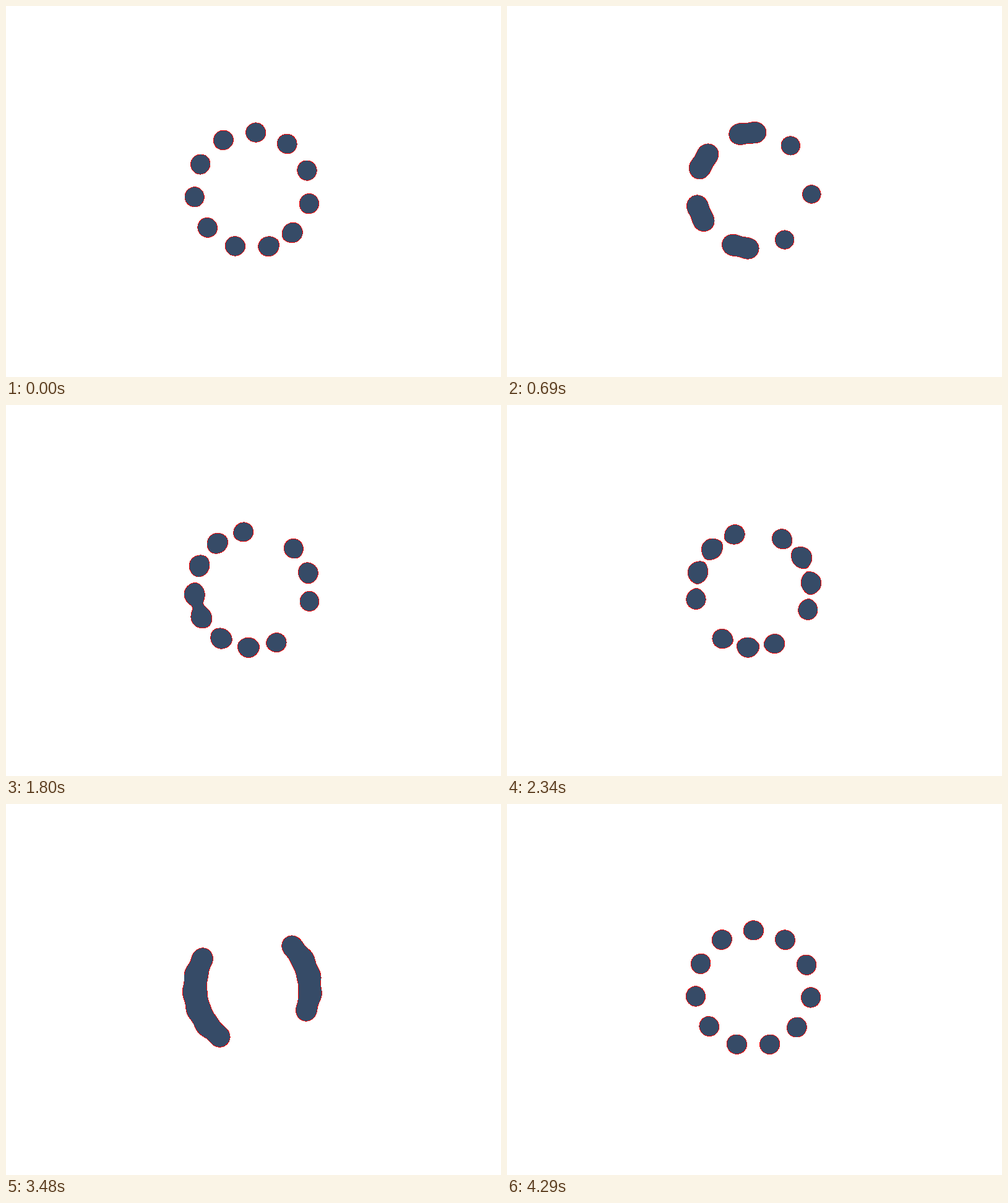
Write an HTML page with a canvas that moves like this. It is 800 px wide and 600 px high and loops after 4320 ms.

```html
<!DOCTYPE html>
<html lang="en">
<head>
<meta charset="utf-8">
<title>Metaball ring</title>
<style>
  html, body { margin: 0; width: 100%; height: 100%; overflow: hidden; background: #fff; }
  canvas { display: block; }
</style>
</head>
<body>
<canvas id="stage" width="800" height="600"></canvas>
<script>
const ctx = document.getElementById('stage').getContext('2d');

const LOOP = 4320, STEP = 30;
const COUNT = 11, CX = 398.2, CY = 298.5, RING = 94.5, PHASE = 40.8;
const STRENGTH = 203;                 // squared radius of a lone ball
const RIM = 0.8;                      // width of the red edge
const LEFT = 264, TOP = 164, SIZE = 268;
const START = 33.22, TRAVEL = 360 * 5 / COUNT;

// [time in ms, spread angle in degrees, speed in degrees per ms]
const keys = [
  [0, START, 0.0133],
  [690, 53.8, 0.048],
  [1200, 82.45, 0.053],
  [1800, 110.43, 0.040],
  [2820, 144.85, 0.036],
  [3480, 171.15, 0.044],
  [3780, 184.2, 0.037],
  [LOOP, START + TRAVEL, 0.0133]
];

// Cubic Hermite interpolation between the keys
function spreadAt(t) {
  let i = 0;
  while (i < keys.length - 2 && t >= keys[i + 1][0]) i++;
  const [t0, a0, v0] = keys[i], [t1, a1, v1] = keys[i + 1];
  const d = t1 - t0, p = (t - t0) / d, q = 1 - p;
  return a0 * q * q * (1 + 2 * p) + a1 * p * p * (3 - 2 * p)
       + d * p * q * (v0 * q - v1 * p);
}

// Ball n turns n times as fast as the first one
function ballsAt(t) {
  const spread = spreadAt(t);
  return Array.from({ length: COUNT }, (_, i) => {
    const a = (PHASE + (i + 1) * spread) * Math.PI / 180;
    return [CX + RING * Math.cos(a), CY + RING * Math.sin(a)];
  });
}

const image = ctx.createImageData(SIZE, SIZE);
const pixels = new Uint32Array(image.data.buffer);
const rgb = (r, g, b) => (255 << 24 | b << 16 | g << 8 | r) >>> 0;
const WHITE = rgb(255, 255, 255), FILL = rgb(54, 75, 103), EDGE = rgb(255, 0, 0);

function colourAt(x, y, balls) {
  let field = 0, gx = 0, gy = 0;
  for (const [bx, by] of balls) {
    const dx = x - bx, dy = y - by;
    const near = 1 / (dx * dx + dy * dy + 1e-6), pull = STRENGTH * near;
    field += pull;
    gx += 2 * pull * near * dx;
    gy += 2 * pull * near * dy;
  }
  if (field < 1) return WHITE;
  // Depth below the surface, to first order
  return field - 1 < RIM * Math.hypot(gx, gy) && field < 1.3 ? EDGE : FILL;
}

function draw(t) {
  const balls = ballsAt(t);
  for (let y = 0, k = 0; y < SIZE; y++) {
    for (let x = 0; x < SIZE; x++, k++) {
      pixels[k] = colourAt(x + LEFT + 0.5, y + TOP + 0.5, balls);
    }
  }
  ctx.putImageData(image, LEFT, TOP);
}

const begin = performance.now();
let shown = -1;
function tick() {
  const elapsed = (performance.now() - begin) % LOOP;
  const t = Math.floor(elapsed / STEP) * STEP;
  if (t !== shown) draw(shown = t);
  requestAnimationFrame(tick);
}
tick();
</script>
</body>
</html>
```
